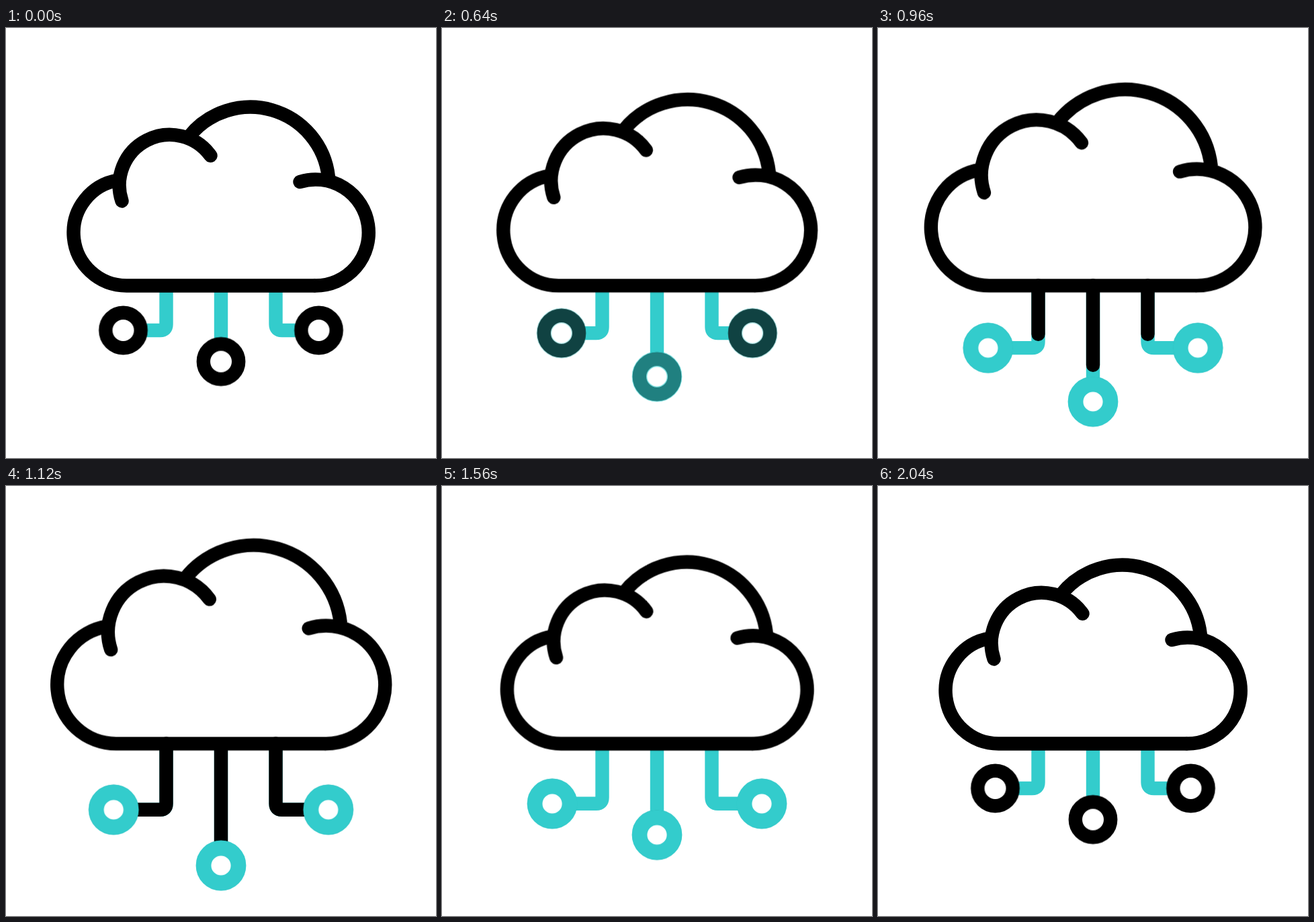
An HTML page without scripts that plays this animation: 640x640 px, repeating every 2.4 s.

```html
<!DOCTYPE html>
<html lang="en">
<head>
<meta charset="utf-8">
<title>Cloud network</title>
<style>
  html, body { margin: 0; height: 100%; overflow: hidden; background: #fff; }
  svg { display: block; width: 100%; height: 100%; }

  path, circle { fill: none; stroke: #000; stroke-width: 20.4; }
  .wire, .glow { stroke: #33cccc; }
  .glow { stroke-width: 22.8; opacity: 0; }
  .pulse { stroke-linecap: round; stroke-dasharray: 1 9; stroke-dashoffset: 1.05; }

  .cloud, .cloud path, .wire, .pulse, .node, .glow {
    animation: 2.4s linear infinite;
  }
  .cloud { transform-origin: 320px 383.5px; animation-name: breathe; }
  .cloud path { stroke-linecap: round; vector-effect: non-scaling-stroke; animation: none; }
  .cloud .butt { stroke-linecap: butt; }

  .mid .wire { animation-name: mid-wire; }
  .mid .pulse { animation-name: mid-wire, mid-pulse; }
  .mid .node { animation-name: mid-node; }
  .mid .glow { animation-name: mid-glow; }
  .side .wire { animation-name: side-wire; }
  .side .pulse { animation-name: side-wire, side-pulse; }
  .side .node { animation-name: side-node; }
  .side .glow { animation-name: side-glow; }

  /* Each part squashes, stretches out, springs back and settles. */
  @keyframes breathe {
    0%, 8.33% { transform: scale(1); animation-timing-function: ease-in-out; }
    16.25% { transform: scale(.951); animation-timing-function: cubic-bezier(.12, .35, .45, 1); }
    53.33% { transform: scale(1.115); animation-timing-function: cubic-bezier(.3, 0, .5, 1); }
    72.5% { transform: scale(.988); animation-timing-function: ease-in-out; }
    80%, 100% { transform: scale(1); }
  }

  @keyframes mid-node {
    0%, 8.33% { transform: translate(320px, 496.5px); animation-timing-function: ease-in-out; }
    18.33% { transform: translate(320px, 473.5px); animation-timing-function: cubic-bezier(.12, .35, .45, 1); }
    55% { transform: translate(320px, 568.5px); animation-timing-function: cubic-bezier(.3, 0, .5, 1); }
    74.58% { transform: translate(320px, 491.5px); animation-timing-function: ease-in-out; }
    82.5%, 100% { transform: translate(320px, 496.5px); }
  }
  @keyframes mid-wire {
    0%, 8.33% { d: path("M320 383.5V470.5"); animation-timing-function: ease-in-out; }
    18.33% { d: path("M320 383.5V447.5"); animation-timing-function: cubic-bezier(.12, .35, .45, 1); }
    55% { d: path("M320 383.5V542.5"); animation-timing-function: cubic-bezier(.3, 0, .5, 1); }
    74.58% { d: path("M320 383.5V465.5"); animation-timing-function: ease-in-out; }
    82.5%, 100% { d: path("M320 383.5V470.5"); }
  }

  @keyframes side-node {
    0%, 8.33% { transform: translate(174.5px, 450px); animation-timing-function: cubic-bezier(.3, 0, .5, 1); }
    21.5% { transform: translate(187.5px, 439px); animation-timing-function: cubic-bezier(.12, .35, .45, 1); }
    58.33% { transform: translate(158px, 485.3px); animation-timing-function: cubic-bezier(.3, 0, .5, 1); }
    79.17% { transform: translate(176.5px, 447px); animation-timing-function: ease-in-out; }
    85%, 100% { transform: translate(174.5px, 450px); }
  }
  @keyframes side-wire {
    0%, 8.33% { d: path("M238.5 383.5V441Q238.5 450 229.5 450H200.5"); animation-timing-function: cubic-bezier(.3, 0, .5, 1); }
    21.5% { d: path("M238.5 383.5V430Q238.5 439 229.5 439H213.5"); animation-timing-function: cubic-bezier(.12, .35, .45, 1); }
    58.33% { d: path("M238.5 383.5V476.3Q238.5 485.3 229.5 485.3H184"); animation-timing-function: cubic-bezier(.3, 0, .5, 1); }
    79.17% { d: path("M238.5 383.5V438Q238.5 447 229.5 447H202.5"); animation-timing-function: ease-in-out; }
    85%, 100% { d: path("M238.5 383.5V441Q238.5 450 229.5 450H200.5"); }
  }

  /* A black pulse fills the wire from the cloud, then drains into the node. */
  @keyframes mid-pulse {
    0%, 28.33% { stroke-dashoffset: 1.05; animation-timing-function: ease-in-out; }
    45% { stroke-dashoffset: 0; animation-timing-function: ease-in-out; }
    56.67%, 100% { stroke-dashoffset: -1.05; }
  }
  @keyframes side-pulse {
    0%, 31.25% { stroke-dashoffset: 1.05; animation-timing-function: ease-in-out; }
    47.92% { stroke-dashoffset: 0; animation-timing-function: ease-in-out; }
    59.58%, 100% { stroke-dashoffset: -1.05; }
  }

  @keyframes mid-glow {
    0%, 21.5% { opacity: 0; }
    29.8%, 67% { opacity: 1; }
    75.4%, 100% { opacity: 0; }
  }
  @keyframes side-glow {
    0%, 24% { opacity: 0; }
    32.3%, 70.4% { opacity: 1; }
    78.8%, 100% { opacity: 0; }
  }
</style>
</head>
<body>
<svg viewBox="0 0 640 640">
  <g class="side">
    <path class="wire" d="M238.5 383.5V441Q238.5 450 229.5 450H200.5"/>
    <path class="pulse" pathLength="1" d="M238.5 383.5V441Q238.5 450 229.5 450H200.5"/>
    <g class="node"><circle r="26.2"/><circle class="glow" r="26"/></g>
  </g>
  <g class="side" transform="translate(640) scale(-1 1)">
    <path class="wire" d="M238.5 383.5V441Q238.5 450 229.5 450H200.5"/>
    <path class="pulse" pathLength="1" d="M238.5 383.5V441Q238.5 450 229.5 450H200.5"/>
    <g class="node"><circle r="26.2"/><circle class="glow" r="26"/></g>
  </g>
  <g class="mid">
    <path class="wire" d="M320 383.5V470.5"/>
    <path class="pulse" pathLength="1" d="M320 383.5V470.5"/>
    <g class="node"><circle r="26.2"/><circle class="glow" r="26"/></g>
  </g>
  <g class="cloud">
    <path class="butt" d="M272 162A117 117 0 0 1 480 222"/>
    <path class="butt" d="M460.5 383.5H179.5A79 79 0 0 1 167 226.5"/>
    <path d="M437.5 229A79 79 0 1 1 460.5 383.5"/>
    <path d="M172.5 257.5A75 75 0 0 1 304.5 190"/>
  </g>
</svg>
</body>
</html>
```
